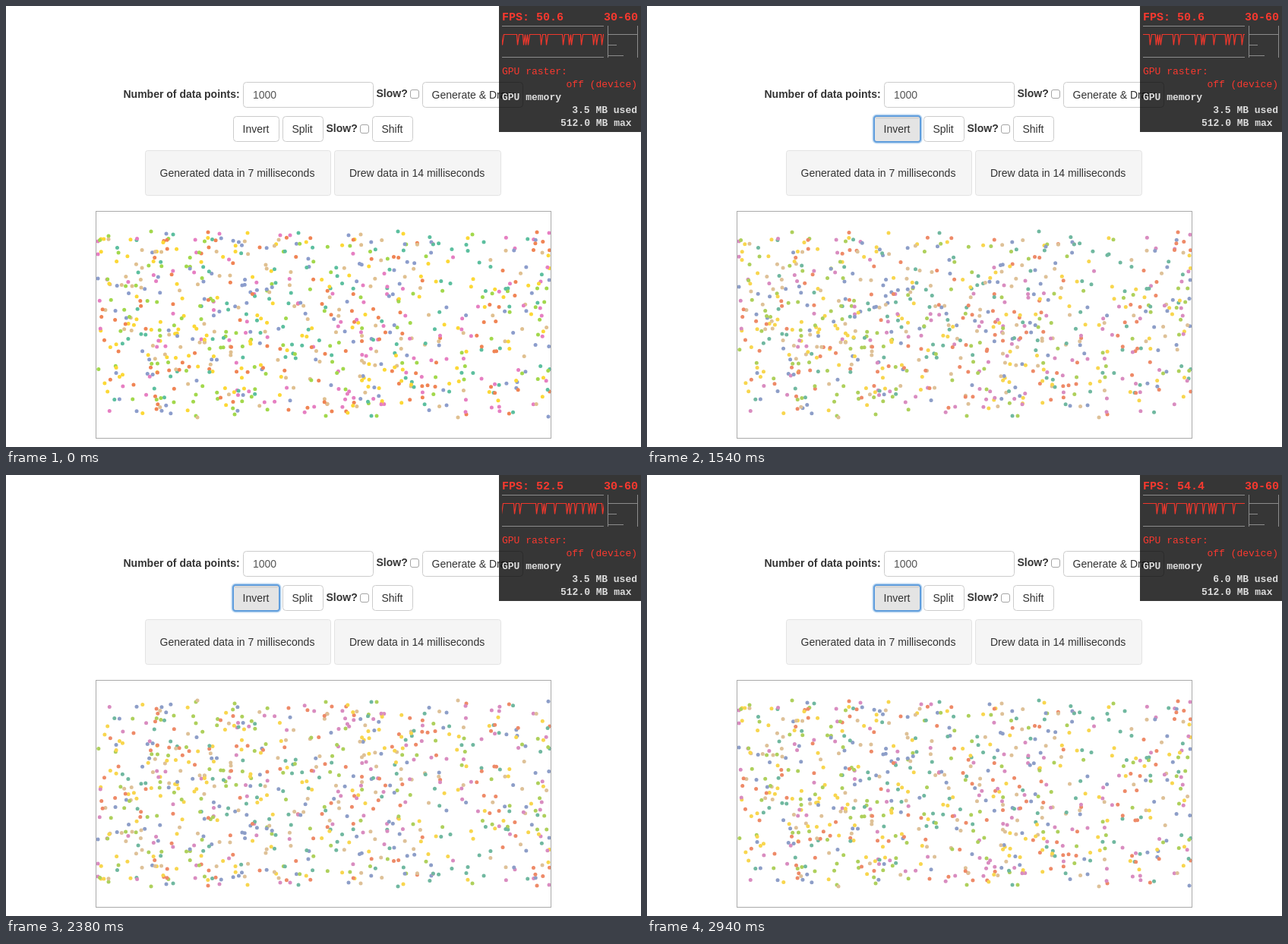
Animation of 836 by 581 pixels, one loop 3.43 s. Source, as an HTML page with a canvas:

```html
<!DOCTYPE html>
<html lang="en">
<head>
<meta charset="utf-8">
<title>Scatter plot inversion</title>
<style>
html, body { margin: 0; width: 100%; height: 100%; overflow: hidden; background: #fff; }
canvas, svg { position: absolute; left: 0; top: 0; }
text { white-space: pre; font: 14px "Liberation Sans", Arial, sans-serif; fill: #333; }
.bold { font-weight: bold; }
.btn { fill: #fff; stroke: #ccc; }
.well { fill: #f5f5f5; stroke: #e3e3e3; }
.tick { fill: #fff; stroke: #a5a5a5; }
#hud text { font: bold 13px "Liberation Mono", "Courier New", monospace; fill: #ddd; }
#hud .big { font-size: 15px; }
#hud .red { fill: #f9392f; }
#hud .thin { font-weight: normal; }
.axis { fill: none; stroke: #8c8c8c; }
</style>
</head>
<body>
<canvas id="plot" width="836" height="581"></canvas>
<svg width="836" height="581">
  <text class="bold" x="154.500" y="121">Number of data points:</text>
  <rect class="btn" x="312.500" y="100.500" width="171" height="33" rx="4"/>
  <text x="325" y="122" style="fill:#555">1000</text>
  <text class="bold" x="487.500" y="120">Slow?</text>
  <rect class="tick" x="532.500" y="110.500" width="11" height="11" rx="2.500"/>
  <rect class="btn" x="548.500" y="100.500" width="132" height="33" rx="4"/>
  <text x="560.500" y="122">Generate &amp; Draw</text>

  <rect class="btn" x="299.500" y="145.500" width="60" height="33" rx="4"/>
  <g id="focus">
    <rect x="298.500" y="144.500" width="62" height="35" rx="4" fill="none" stroke="#5b9ddd" stroke-opacity=".4" stroke-width="4"/>
    <rect x="299" y="145" width="61" height="34" rx="3.500" fill="#e4e4e4" stroke="#5f9ddd" stroke-width="2"/>
    <path d="M301 147.500H358" stroke="#d2d2d2" stroke-width="2"/>
  </g>
  <text x="311.500" y="167">Invert</text>
  <rect class="btn" x="364.500" y="145.500" width="53" height="33" rx="4"/>
  <text x="376.500" y="167">Split</text>
  <text class="bold" x="421.500" y="166">Slow?</text>
  <rect class="tick" x="466.500" y="156.500" width="11" height="11" rx="2.500"/>
  <rect class="btn" x="482.500" y="145.500" width="53" height="33" rx="4"/>
  <text x="494.500" y="167">Shift</text>

  <rect class="well" x="183.500" y="190.500" width="244" height="59" rx="3"/>
  <text x="202.500" y="225">Generated data in 7 milliseconds</text>
  <rect class="well" x="432.500" y="190.500" width="219" height="59" rx="3"/>
  <text x="452" y="225">Drew data in 14 milliseconds</text>
  <rect x="118.500" y="270.500" width="599" height="299" fill="none" stroke="#aaa"/>

  <g id="hud">
    <clipPath id="clip"><rect x="653" y="26" width="134" height="42"/></clipPath>
    <rect x="649" width="187" height="166" fill="#000" fill-opacity=".79"/>
    <text class="big red" x="653" y="19" id="fps"></text>
    <text class="big red" x="832" y="19" text-anchor="end">30-60</text>
    <path class="axis" d="M653 26.500H787M653 67.500H787M792.500 26V68M831.500 26V68M793 37.500H831M793 51.500H804M793 65.500H813"/>
    <path id="graph" clip-path="url(#clip)" fill="none" stroke="#f0372c" stroke-width="1.200"/>
    <text class="red thin" x="653" y="90">GPU raster:</text>
    <text class="red thin" x="831" y="107" text-anchor="end">off (device)</text>
    <text x="653" y="124">GPU memory</text>
    <text x="831" y="141" text-anchor="end" id="used"></text>
    <text x="730" y="158">512.0 MB max</text>
  </g>
</svg>
<script>
const LOOP = 3430, STEP = 70, FIRST = 1400, SECOND = 2380;
const MOVE = 290, SPREAD = 260, COUNT = 800;
const byId = id => document.getElementById(id);
const ctx = byId('plot').getContext('2d');

// teal, orange, blue, pink, green, yellow, tan
const vivid = ['#5cbf9f', '#f08454', '#8c9dcc', '#e67fc2', '#a2d84c', '#fcd836', '#e0c090'];
const soft = ['#70b8a0', '#ee8a68', '#8d9ec8', '#d98cc0', '#aed05c', '#f8d64e', '#dec198'];

let seed = 20;
function random() {
  seed = (Math.imul(seed, 1664525) + 1013904223) >>> 0;
  return seed / 4294967296;
}

// x, y, colour of the dots along the rim, earliest mover first
const rim = [
  [714, 541, 2], [361, 302, 3], [374, 302, 3], [211, 300, 2], [220, 301, 0],
  [451, 302, 2], [467, 301, 6], [135, 303, 4], [125, 307, 5], [121, 359, 2],
  [523, 300, 5], [281, 300, 3], [614, 301, 4], [121, 327, 3], [715, 299, 3],
  [191, 297, 4], [266, 298, 1], [318, 299, 5], [516, 297, 0], [699, 298, 1],
  [385, 299, 0], [121, 310, 3], [606, 538, 1], [301, 538, 4], [250, 540, 4],
  [421, 540, 4], [481, 540, 0], [488, 540, 4], [252, 542, 6], [595, 542, 6]
];
const dots = rim.map(([x, y, c], i) => ({ x, y, c, wait: SPREAD * i / rim.length }));
while (dots.length < COUNT) {
  dots.push({
    x: 121 + 595 * random() ** 1.08,
    y: 303 + 234 * random(),
    c: Math.floor(random() * 7),
    wait: SPREAD * random() ** 0.7
  });
}

const dips = [654, 674, 682, 685, 688, 705, 712, 734, 742, 745, 758, 774, 778, 785, 795, 803, 807, 811, 821, 835];
byId('graph').setAttribute('d', 'M600 37.5' +
  dips.map(x => `H${x - 1.5}L${x - 0.5} 51.5L${x + 1.5} 37.5`).join('') + 'H900');

const ease = p => p < 0.5 ? 4 * p ** 3 : 1 - 4 * (1 - p) ** 3;
const clamp = (v, lo, hi) => Math.max(lo, Math.min(hi, v));
const latest = (t, table) => table.filter(row => t >= row[0]).pop()[1];
const stepsSince = (t, start) => clamp(Math.floor((t - start) / STEP) + 1, 0, 9);

function drawDots(t) {
  const back = t >= SECOND;
  const steps = stepsSince(t, back ? SECOND : FIRST);
  const clock = steps ? (steps - 1) * STEP + 20 : 0;
  const colours = t < 910 ? vivid : soft;
  ctx.clearRect(0, 0, 836, 581);
  for (const { x, y, c, wait } of dots) {
    const p = ease(clamp((clock - wait) / MOVE, 0, 1));
    ctx.fillStyle = colours[c];
    ctx.beginPath();
    ctx.arc(x, y + (839 - 2 * y) * (back ? 1 - p : p), 2.5, 0, 7);
    ctx.fill();
  }
}

function drawHud(t) {
  const n = (t >= 910) + stepsSince(t, FIRST) + stepsSince(t, SECOND);
  const shift = n ? 1 + 3.4 * (n - 1) : 0;
  byId('graph').style.transform = '';
  byId('graph').setAttribute('transform', `translate(${-shift})`);
  byId('clip').firstChild.setAttribute('x', 653 + shift);
  byId('fps').textContent = 'FPS: ' + latest(t, [[0, '50.6'], [1680, '52.5'], [2520, '52.9'], [2940, '54.4']]);
  byId('used').textContent = latest(t, [[0, '3.5'], [1680, '4.5'], [1960, '3.5'], [2520, '4.5'], [2940, '6.0']]) + ' MB used';
}

const begin = performance.now();
function frame() {
  const t = (performance.now() - begin) % LOOP;
  byId('focus').style.display = t < 910 ? 'none' : '';
  drawDots(t);
  drawHud(t);
  requestAnimationFrame(frame);
}
frame();
</script>
</body>
</html>
```
